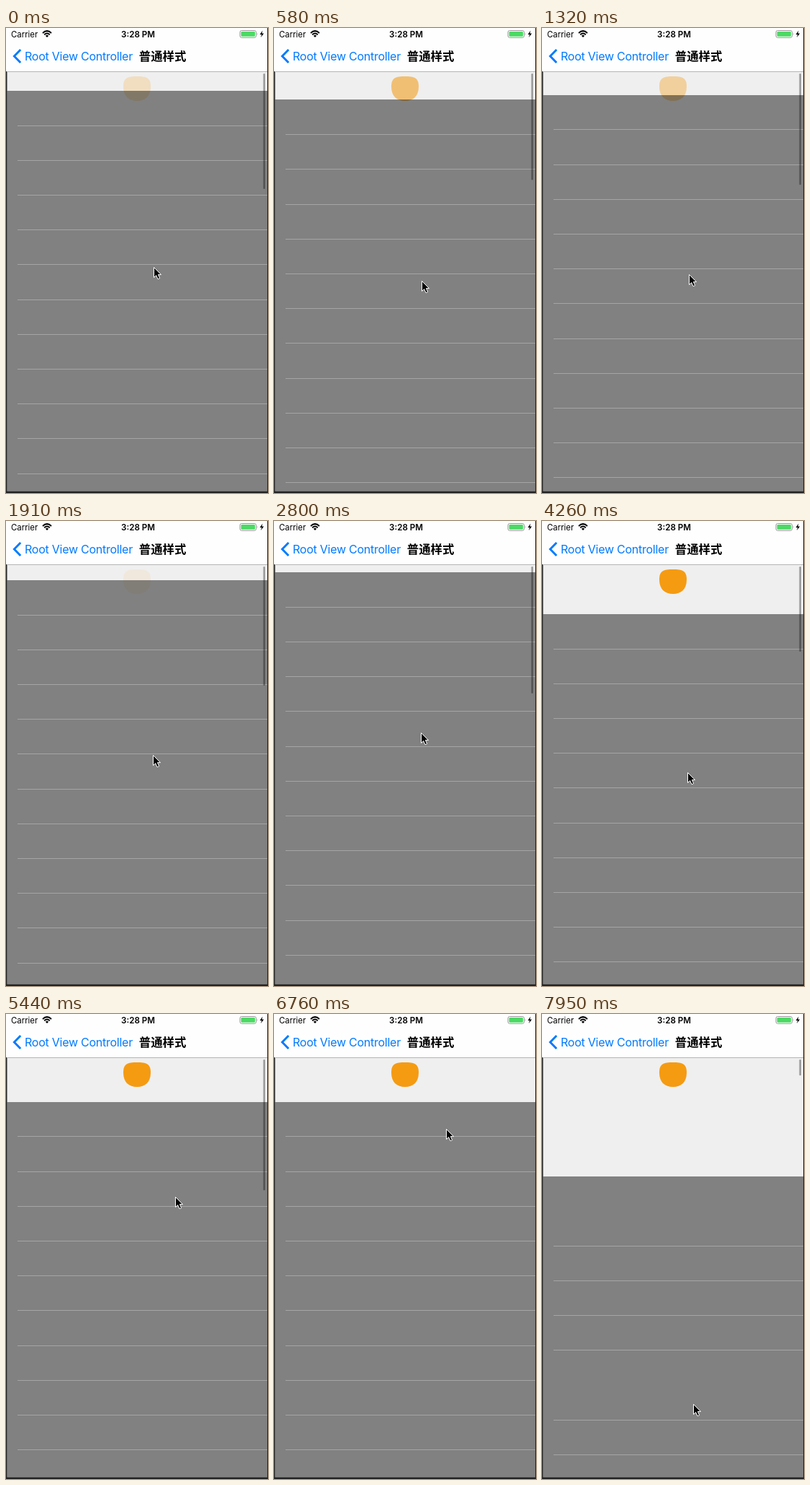
Recreate the animation shown at these times as an HTML page. Size 364x644 px, loop 8 s.

```html
<!DOCTYPE html>
<html lang="en">
<head>
<meta charset="utf-8">
<title>Pull to refresh</title>
<style>
  html, body { margin: 0; width: 100%; height: 100%; overflow: hidden; background: #222; }
  svg { display: block; width: 364px; height: 644px; }
  text { font-family: Inter, "Liberation Sans", sans-serif; }
  .cjk { font-family: "Noto Sans CJK SC", "Noto Sans CJK", sans-serif; font-weight: 700; }
</style>
</head>
<body>
<svg viewBox="0 0 364 644">
  <rect width="364" height="644" fill="#222"/>
  <rect x="1.5" width="361.5" height="641.5" fill="#efefef"/>

  <path id="face" fill="#f59b12" d="M182 67C195 67 201 69 201 81C201 95 193 101 182 101C171 101 163 95 163 81C163 69 169 67 182 67Z"/>
  <rect id="cells" x="1.5" width="361.5" fill="#000" fill-opacity=".4644"/>
  <g id="lines" fill="#a5a5a5"></g>
  <rect id="bar" x="357.4" y="63" width="2.6" rx="1.3" fill="#000" fill-opacity=".35"/>

  <rect width="363" height="60" fill="#fefefe"/>
  <rect x="1" y="60" width="362" height="1" fill="#b5b5b5"/>
  <text x="7" y="12.5" font-size="11.4">Carrier</text>
  <g fill="none" stroke="#000" stroke-width="2">
    <path d="M51 6.9Q57 1.3 63 6.9"/>
    <path d="M53.2 9.2Q57 5.8 60.8 9.2"/>
  </g>
  <path d="M54.9 10.7Q57 9 59.1 10.7L57 13Z"/>
  <text x="183.5" y="12.5" font-size="11.6" font-weight="600" text-anchor="middle">3:28 PM</text>
  <rect x="325" y="3.5" width="22.5" height="9.8" rx="2.4" fill="#fff" stroke="#999"/>
  <rect x="326.5" y="5" width="19.5" height="6.8" rx="1.2" fill="#4cd964"/>
  <path d="M348.8 6.6Q350.6 8.4 348.8 10.2Z" fill="#999"/>
  <path d="M356.5 3.5L352.6 9H355.2L354 13L358.2 7.4H355.5Z"/>
  <path d="M20.2 30L11.4 39L20.2 48" fill="none" stroke="#007aff" stroke-width="2.9"/>
  <text x="26" y="45" font-size="16" letter-spacing="-.25" fill="#007aff">Root View Controller</text>
  <text class="cjk" x="184.8" y="45" font-size="16.4">普通样式</text>

  <path id="cursor" d="M.5 .5V14.5L3.7 11.6L6 16.7L8.6 15.6L6.4 10.6H10.5Z" stroke="#fff" stroke-width="1"/>
</svg>
<script>
const LOOP = 8000, TICK = 147.2, LAST = 54;
const TOP = 61, ROW = 48.2, BOTTOM = 641.5;
const REST = 60.7, SHUT = -.1;

// tick, distance the list is pulled down
const PULL = [
  [0, 25.9], [5, 39.9], [9, 31.7], [17, 10.1], [19, 10.1], [22, SHUT], [29, 67.9],
  [31, 86.1], [34, REST], [47, REST], [50, SHUT], [52, SHUT], [LAST, 163.8]
];

// tick, pointer x, pointer y
const POINTER = [
  [0, 205, 331], [5, 205, 352], [9, 204, 341], [19, 204, 293], [22, 203, 245],
  [29, 202, 348], [37, 235, 253], [46, 239, 159], [52, 212, 190], [LAST, 210, 540]
];

const $ = id => document.getElementById(id);
const set = (el, attrs) => {
  for (const name in attrs) el.setAttribute(name, attrs[name]);
};
const clamp = v => Math.min(1, Math.max(0, v));
const within = (v, from, to) => v >= from && v < to;

const lines = Array.from({ length: 12 }, () => {
  const line = document.createElementNS("http://www.w3.org/2000/svg", "rect");
  set(line, { x: 16, width: 347, height: 1 });
  return $("lines").appendChild(line);
});

// Eased values between the two keys around a tick
function ease(keys, tick) {
  const next = Math.max(1, keys.findIndex(k => k[0] >= tick));
  const [t0, ...a] = keys[next - 1];
  const [t1, ...b] = keys[next];
  const u = (tick - t0) / (t1 - t0);
  const s = u * u * (3 - 2 * u);
  return a.map((v, i) => v * (1 - s) + b[i] * s);
}

function draw(time) {
  const tick = Math.min(LAST, Math.floor((time + 13) / TICK));
  const [pull] = ease(PULL, tick);
  const [x, y] = ease(POINTER, tick).map(Math.round);
  const edge = TOP + pull;
  const top = Math.round(edge);
  const refreshing = within(tick, 33, 48);

  set($("face"), { opacity: clamp((pull - 18) / 37) });
  set($("cells"), { y: top, height: BOTTOM - top });
  lines.forEach((line, i) => {
    const pos = edge + ROW * (i + 1);
    // hairlines that land on a whole pixel vanish
    const lost = Math.abs(pos - Math.round(pos)) < .02;
    set(line, { y: Math.floor(pos), visibility: lost || pos > 640 ? "hidden" : "visible" });
  });
  set($("bar"), {
    height: 186 - pull + (refreshing ? 56 : 0),
    visibility: within(tick, 42, 53) ? "hidden" : "visible"
  });
  set($("cursor"), { transform: `translate(${x} ${y})` });
}

const start = performance.now();
function loop(now) {
  draw(Math.max(0, now - start) % LOOP);
  requestAnimationFrame(loop);
}
draw(0);
requestAnimationFrame(loop);
</script>
</body>
</html>
```
